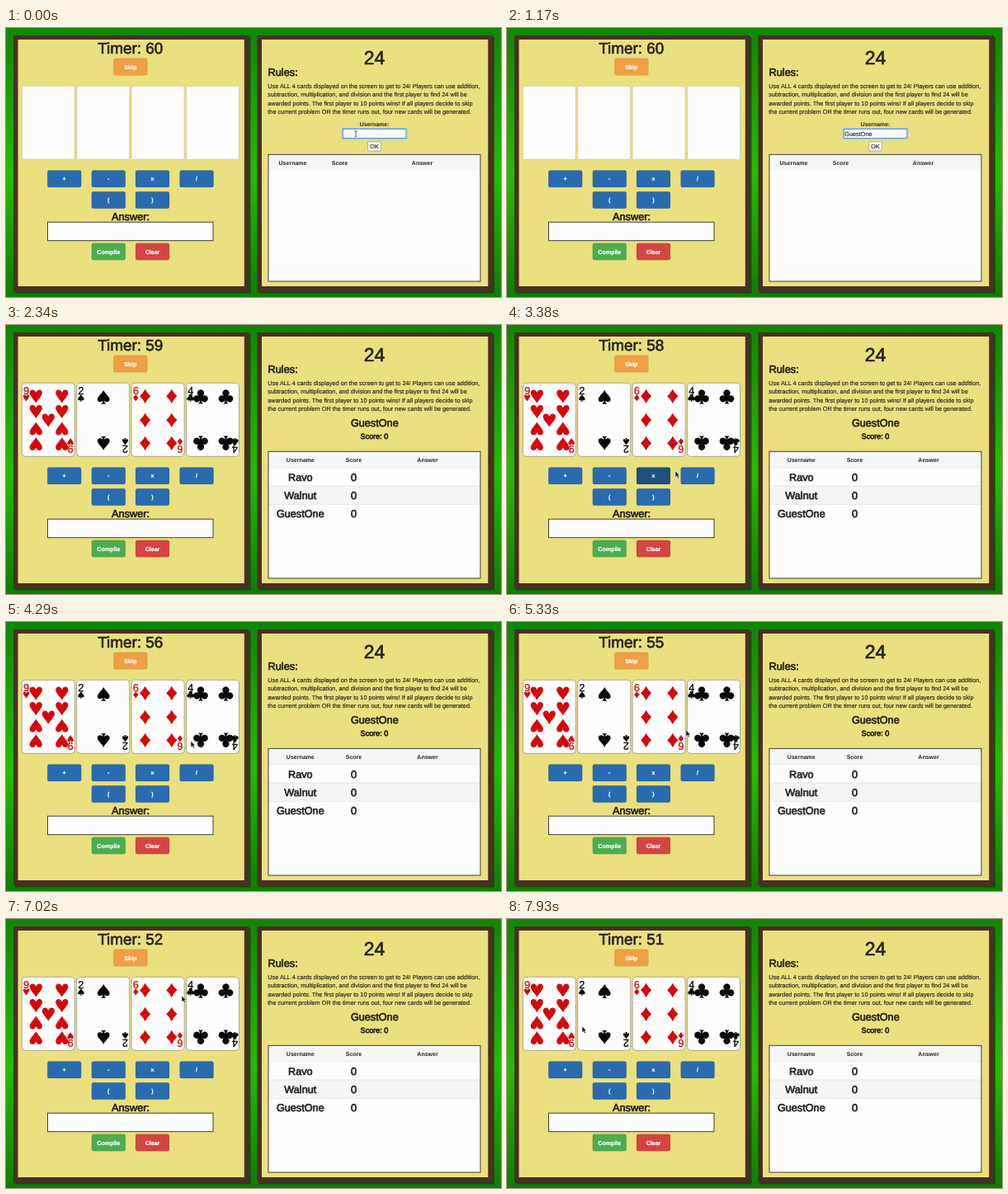
Animation, 600 px wide and 326 px high, one loop 8 s. Source, as an HTML page:

```html
<!DOCTYPE html>
<html lang="en">
<head>
<meta charset="utf-8">
<title>24</title>
<style>
html, body { margin: 0; width: 100%; height: 100%; overflow: hidden; }
svg { display: block; width: 100vw; height: 100vh; font: 7px "Liberation Sans", Arial, sans-serif; text-rendering: geometricPrecision; }
.mid { text-anchor: middle; }
.bold { font-weight: bold; }
.head { stroke: #262420; stroke-width: .68; }
.body { stroke: #262420; stroke-width: .16; }
.label { font-weight: bold; stroke: #fff; stroke-width: .22; }
</style>
</head>
<body>
<svg id="stage" viewBox="0 0 600 326" fill="#262420"></svg>
<script>
const STEP = 130, LOOP = 8000, JOIN = 1560, TICK = 650;
const PLAYER = "GuestOne", PLAYERS = ["Ravo", "Walnut", PLAYER];
const RULES = [
  "Use ALL 4 cards displayed on the screen to get to 24! Players can use addition,",
  "subtraction, multiplication, and division and the first player to find 24 will be",
  "awarded points. The first player to 10 points wins! If all players decide to skip",
  "the current problem OR the timer runs out, four new cards will be generated."
];
const RED = "#d3090c", BLACK = "#080808";
const SUITS = {
  heart: "M0 8.4C-2 4.4-7.6-.2-7.6-4C-7.6-8.8-1.4-9 0-4.2C1.4-9 7.6-8.8 7.6-4C7.6-.2 2 4.4 0 8.4Z",
  diamond: "M0-8.6Q2.6-3.4 6.6 0Q2.6 3.4 0 8.6Q-2.6 3.4-6.6 0Q-2.6-3.4 0-8.6Z",
  spade: "M0-8.6C1.5-4.4 7.4-1 7.4 3C7.4 6.8 2.8 6.8.8 4.2Q1 7.2 3 8.4H-3Q-1 7.2-.8 4.2C-2.8 6.8-7.4 6.8-7.4 3C-7.4-1-1.5-4.4 0-8.6Z",
  club: "M-2-1.2A4.2 4.2 0 1 1 2-1.2A4.2 4.2 0 1 1 .8 3.7Q1 7 3 8.2H-3Q-1 7-.8 3.7A4.2 4.2 0 1 1-2-1.2Z"
};
const MIDDLE = 46;
// rank, suit, colour, pip centres relative to the card
const grid = (xs, ys) => xs.flatMap(x => ys.map(y => [x, y]));
const CARDS = [
  [9, "heart", RED, [...grid([17, 48.5], [16, 34.5, 55.5, 74]), [32, 45]]],
  [2, "spade", BLACK, grid([32.5], [17, 73])],
  [6, "diamond", RED, grid([16.5, 48.7], [16, 45, 73])],
  [4, "club", BLACK, grid([17.5, 48], [17, 72.5])]
];
const BLUE = "#296bae";
const BUTTONS = [
  ["Skip", 130.3, 36.8, "#eda044"],
  ["+", 50.2, 172.6, BLUE], ["-", 103.8, 172.6, BLUE], ["x", 157, 172.6, BLUE], ["/", 210.6, 172.6, BLUE],
  ["(", 103.8, 198.3, BLUE], [")", 157, 198.3, BLUE],
  ["Compile", 103.8, 260.8, "#4cad50"], ["Clear", 157, 260.8, "#d34542"]
];
const BTN_W = 41, BTN_H = 20.5;
// time, x, y
const PATH = [
  [2470, 424, 128], [2860, 110, 120], [3120, 150, 185], [3380, 204, 177],
  [4000, 226, 148], [5330, 217, 131], [6200, 208, 112], [7020, 213, 93], [7930, 91, 130]
];

const rect = (x, y, w, h, fill, more = "") =>
  `<rect x="${x}" y="${y}" width="${w}" height="${h}" fill="${fill}" ${more}/>`;
const text = (s, x, y, size = 7, cls = "mid", more = "") =>
  `<text x="${x}" y="${y}" font-size="${size}" class="${cls}" ${more}>${s}</text>`;
const head = (s, x, y, size) => text(s, x, y, size, "mid head");
// pips below the middle stand upside down
const pip = (suit, x, y, scale = 1) =>
  `<path d="${SUITS[suit]}" transform="translate(${x} ${y}) scale(${y > MIDDLE ? -scale : scale})"/>`;

function panel(x) {
  return rect(x + 2, 11, 285.5, 310.5, "#173d0b", 'opacity=".75"') +
    rect(x, 9, 285.5, 310.5, "#4b2f25") +
    rect(x + 5.5, 14, 274.3, 299, "#ebe07f");
}

function button([label, x, y, fill], hot) {
  return rect(x, y, BTN_W, BTN_H, hot ? "#1f4f80" : fill, 'rx="2.2" stroke="#000" stroke-opacity=".12" stroke-width=".6"') +
    text(label, x + BTN_W / 2, y + 12.8, 7.1, "mid label", 'fill="#fff"');
}

function card([rank, suit, color, pips], i, dealt) {
  const x = 19.3 + i * 66.4, y = 70.3;
  const blank = rect(x, y, 64, 89, "#fefefe", `rx="${dealt ? 4 : 2}" stroke="${dealt ? "#8a8878" : "#c9c29a"}" stroke-width=".7"`);
  if (!dealt) return blank;
  const corner = text(rank, 5.2, 13.4, 12.8, "mid", `stroke="${color}" stroke-width=".3"`) + pip(suit, 5.2, 18, .5);
  return blank + `<g transform="translate(${x} ${y})" fill="${color}">${corner}
    <g transform="rotate(180 32 44.5)">${corner}</g>${pips.map(p => pip(suit, ...p)).join("")}</g>`;
}

function mouse(t) {
  if (t < PATH[0][0]) return null;
  const i = PATH.findIndex(p => p[0] >= t);
  if (i < 1) return PATH.at(i).slice(1);
  const [t0, x0, y0] = PATH[i - 1], [t1, x1, y1] = PATH[i];
  const k = (t - t0) / (t1 - t0);
  return [x0 + (x1 - x0) * k, y0 + (y1 - y0) * k];
}

function login(t) {
  const typed = PLAYER.slice(0, Math.max(0, Math.floor((t - 200) / 105)));
  const beam = typed ? "" : '<path d="M422.5 124.5Q424 124.5 424 126V130.5Q424 132 422.5 132M425.5 124.5Q424 124.5 424 126M424 130.5Q424 132 425.5 132" fill="none" stroke="#222" stroke-width=".7"/>';
  return text("Username:", 446.5, 118.6, 6.9, "mid bold") +
    rect(407.6, 121.8, 78, 12.6, "#fff", 'rx="1" stroke="#9cc7ee" stroke-width="1.8"') +
    rect(408.4, 122.6, 76.4, 11, "#fff", 'stroke="#4384c4" stroke-width=".8"') +
    text(typed, 409.3, 130.8, 7.3, "body") + beam +
    rect(438.5, 137.8, 16, 11.2, "#f6f6f4", 'rx="1" stroke="#9b9985" stroke-width=".7"') +
    text("OK", 446.5, 146, 7.2, "mid body");
}

function table(joined) {
  const cols = joined ? [356.8, 421.5, 511] : [347.5, 404.5, 504.5];
  let s = rect(318, 153.3, 257, 153.7, "#fefdfe") + rect(318, 153.3, 257, 18.7, "#f5f6f8");
  s += ["Username", "Score", "Answer"].map((h, i) => text(h, cols[i], 165.7, 7, "mid bold")).join("");
  if (joined) {
    s += rect(318, 194.8, 257, 22, "#f5f5f6");
    PLAYERS.forEach((name, i) => {
      const y = 172.5 + i * 22.2;
      s += rect(318, y, 257, .7, "#dcdde0") + head(name, cols[0], y + 16.4, 12.7) + head("0", cols[1], y + 16.4, 12.7);
    });
  }
  return s + rect(318, 153.3, 257, 153.7, "none", 'stroke="#2d2b28" stroke-width=".9"');
}

function scene(t) {
  const joined = t >= JOIN;
  const seconds = 60 - Math.max(0, Math.floor((t - JOIN) / TICK));
  const trail = mouse(t - 100), tip = mouse(t);
  const hot = ([, x, y]) => trail && trail[0] > x && trail[0] < x + BTN_W && trail[1] > y && trail[1] < y + BTN_H;
  return `<defs><linearGradient id="felt" x2="0" y2="1">
      <stop stop-color="#108506"/><stop offset=".55" stop-color="#25bd02"/><stop offset="1" stop-color="#0e7c04"/>
    </linearGradient></defs>` +
    rect(0, 0, 600, 326, "url(#felt)") + panel(9) + panel(304.5) +
    head("Timer: " + seconds, 150.8, 31, 18.9) +
    CARDS.map((c, i) => card(c, i, joined)).join("") +
    BUTTONS.map(b => button(b, hot(b))).join("") +
    head("Answer:", 151, 233, 12.8) +
    rect(50.5, 235.2, 200.5, 22.5, "#fefefe", 'stroke="#2d2b28" stroke-width=".9"') +
    head("24", 446.5, 43.5, 23) +
    text("Rules:", 317.5, 58.2, 12.8, "head") +
    RULES.map((line, i) => text(line, 317.3, 73 + i * 10.25, 7.32, "body")).join("") +
    (joined ? head(PLAYER, 446.8, 123.2, 12.7) + text("Score: 0", 446.5, 138.2, 9.1, "mid head") : login(t)) +
    table(joined) +
    (tip ? `<path d="M0 0V7.5L1.8 6L3.1 8.7L4.4 8.1L3.2 5.5H5.4Z" transform="translate(${tip})" fill="#111" stroke="#fff" stroke-width=".5"/>` : "");
}

const stage = document.getElementById("stage");
const start = performance.now();
let shown = -1;
function tick() {
  const t = Math.floor((performance.now() - start) % LOOP / STEP) * STEP;
  if (t !== shown) stage.innerHTML = scene(shown = t);
  requestAnimationFrame(tick);
}
tick();
</script>
</body>
</html>
```
